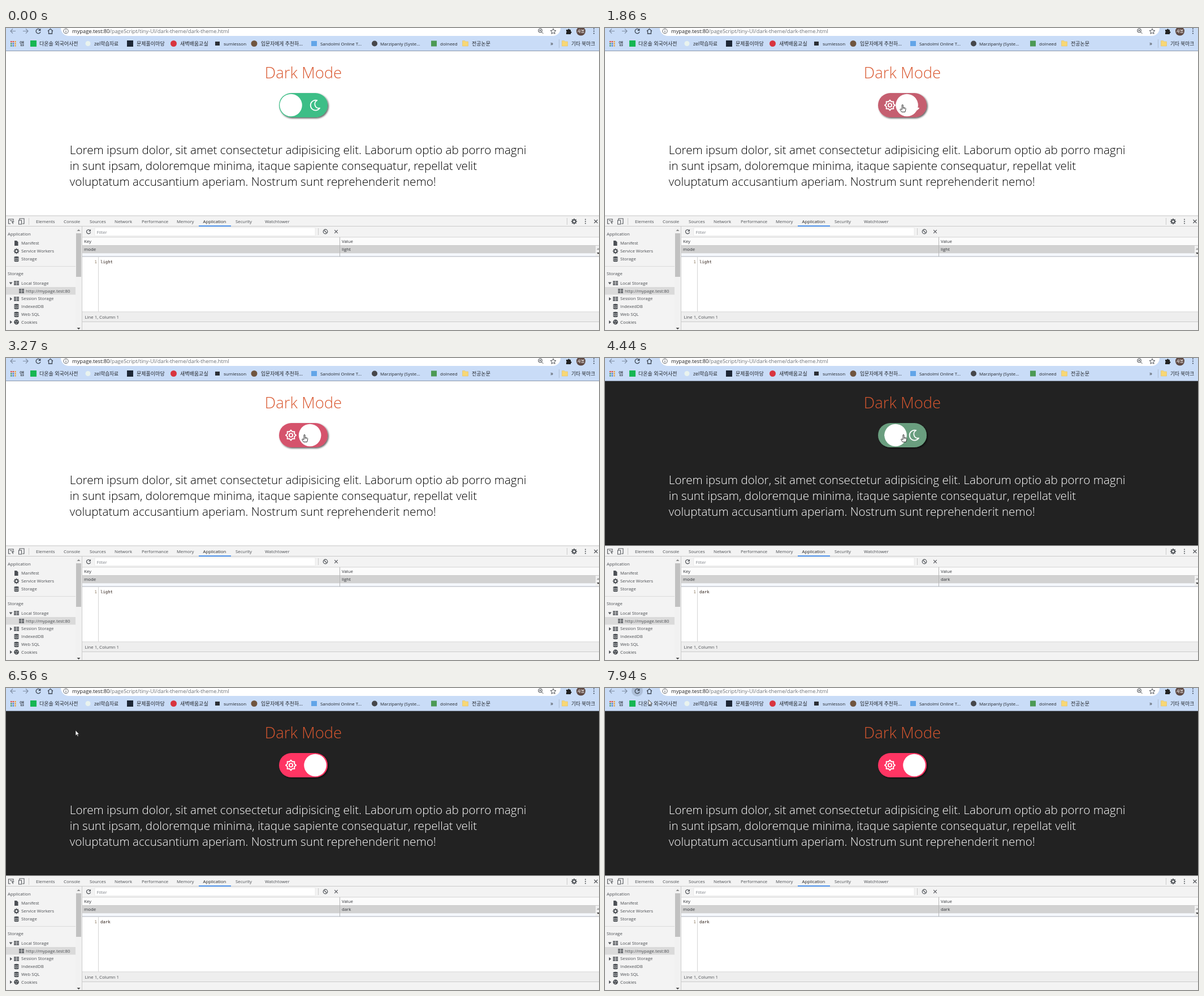
Animation of 1049 by 534 pixels, one loop 8000 ms. Source, as an HTML page:

```html
<!DOCTYPE html>
<html lang="ko">
<head>
<meta charset="utf-8">
<title>Dark mode demo</title>
<style>
html, body { margin: 0; width: 100%; height: 100%; overflow: hidden; background: #fff; }
svg { display: block; width: 100%; height: 100%; }
text { font-family: 'Open Sans', 'Noto Sans CJK KR', 'Noto Sans CJK', sans-serif; white-space: pre; }
.page { font-weight: 300; }
.mono { font-family: 'DejaVu Sans Mono', monospace; }
</style>
</head>
<body>
<svg id="stage" viewBox="0 0 1049 534" preserveAspectRatio="none"></svg>
<script>
const LOOP = 8000, FLIP_MS = 400;
const flips = [1140, 1780, 2474, 3205, 4372];
const reload = { click: 7465, blank: 7540, paint: 7700, text: 7930 };

// pointer hot spot: time, x, y
const trail = [
  [70, 973, 500], [300, 760, 330], [540, 584, 189], [690, 578, 184], [1010, 516, 136],
  [1230, 514.5, 134.5], [1470, 503, 135], [1610, 526, 136], [2350, 527, 136], [2410, 528, 136],
  [4800, 528, 136], [5140, 530, 140], [5500, 73, 451], [5640, 76, 448], [6000, 658, 390],
  [6070, 655, 388], [6310, 46, 436], [6560, 123, 75], [6860, 118, 24], [7240, 57, 5],
  [7470, 57, 5], [7790, 77, 21], [8000, 77, 21]
];

const rect = (x, y, w, h, fill, extra = '') =>
  `<rect x="${x}" y="${y}" width="${w}" height="${h}" fill="${fill}" ${extra}/>`;
const dot = (x, y, r, fill, extra = '') =>
  `<circle cx="${x}" cy="${y}" r="${r}" fill="${fill}" ${extra}/>`;
const path = (d, fill, stroke = 'none', w = 1, extra = '') =>
  `<path d="${d}" fill="${fill}" stroke="${stroke}" stroke-width="${w}" ${extra}/>`;
const line = (d, stroke, w = 1) => path(d, 'none', stroke, w);
const label = (x, y, s, size = 7.8, fill = '#4a4d51', extra = '') =>
  `<text x="${x}" y="${y}" font-size="${size}" fill="${fill}" ${extra}>${s}</text>`;
const at = (x, y, s, extra = '') => `<g transform="translate(${x} ${y})" ${extra}>${s}</g>`;

// closed ring whose radius follows a repeating list
function ring(radii, repeats, turn = 0) {
  const n = radii.length * repeats, pts = [];
  for (let i = 0; i < n; i++) {
    const a = (i + turn) / n * Math.PI * 2, r = radii[i % radii.length];
    pts.push((r * Math.cos(a)).toFixed(2) + ' ' + (r * Math.sin(a)).toFixed(2));
  }
  return 'M' + pts.join('L') + 'Z';
}
const cog = (x, y, r) => at(x, y, path(ring([r, r, r * .72, r * .72], 8, -.5), '#4d5156') + dot(0, 0, r * .35, '#f3f3f3'));
const disk = (x, y) => at(x, y,
  path('M-4 -3.2A4 1.5 0 0 1 4 -3.2V3.2A4 1.5 0 0 1 -4 3.2Z', '#4d5156') +
  line('M-4 -1.5Q0 .3 4 -1.5M-4 1.4Q0 3.2 4 1.4', '#f3f3f3', .8));
const table = (x, y) => at(x, y, rect(-4.5, -3.7, 9, 7.4, '#4d5156') +
  line('M-4.5 -1.3H4.5M-4.5 1.2H4.5M0 -3.7V3.7', '#e6e6e6', .8));
const spin = (x, y, r, color) => at(x, y,
  line(`M${r * .8} ${-r * .6}A${r} ${r} 0 1 0 ${r} ${r * .3}`, color, 1.3) +
  path(`M${r * 1.1} ${-r * 1.2}V${-r * .1}H0Z`, color));
const folder = (x, y) => path(`M${x - 5} ${y - 5}h4l1.5 1.5H${x + 5}v8H${x - 5}Z`, '#f8d775', '#e0bb55', .5);
const cross = (x, y, r, color) => line(`M${x - r} ${y - r}l${2 * r} ${2 * r}m0 ${-2 * r}l${-2 * r} ${2 * r}`, color, 1.2);
const dots = (x, y, step, color) => [-1, 0, 1].map(k => dot(x, y + k * step, 1, color)).join('');

function browserBar() {
  const ink = '#3c4450', soft = '#7f8ea3';
  const bar = rect(0, 0, 1049, 41, '#c9dcf7') +
    rect(97, -14, 884, 28, '#fff', 'rx="14"') +
    rect(0, 40, 1049, 1, '#8a98ab') +
    line('M17 5.5H8M12 1.5L8 5.5L12 9.5', soft, 1.2) +
    line('M30 5.5H39M35 1.5L39 5.5L35 9.5', soft, 1.2) +
    dot(57, 5, 10, '#aebfd8', 'id="hover"') +
    `<g id="again">${spin(57, 5.5, 4, ink)}</g><g id="stop">${cross(57, 5.5, 3.5, ink)}</g>` +
    line('M74 5.5L78.5 1.5L83 5.5M75.5 5V10H81.5V5', ink, 1.3) +
    dot(106, 5.5, 4.2, 'none', 'stroke="#5f6368"') + line('M106 5V8M106 3V4', '#5f6368', 1.1) +
    label(117, 9, 'mypage.test:80<tspan fill="#6d7278">/pageScript/tiny-UI/dark-theme/dark-theme.html</tspan>', 9.3, '#202124') +
    dot(945, 4.5, 3.2, 'none', 'stroke="#4d5156" stroke-width="1.1"') +
    line('M947.5 7L950.5 10M943.5 4.5H946.5M945 3V6', '#4d5156') +
    path('M968 1L969.4 4.2L973 4.5L970.3 6.8L971.1 10.3L968 8.4L964.9 10.3L965.7 6.8L963 4.5L966.6 4.2Z', 'none', '#4d5156', 1) +
    path('M991 3H994A1.5 1.5 0 0 1 997 3H999V6A1.5 1.5 0 0 1 999 9V11H991V8A1.4 1.4 0 0 0 991 5.5Z', '#222') +
    dot(1017, 5.5, 8, '#5d4842') + label(1017, 8.3, '새봄', 7, '#fff', 'text-anchor="middle"') +
    dots(1040, 5.5, 4, ink);
  let apps = '';
  ['#e0513f', '#e0513f', '#e9a33a', '#4d9a58', '#4679d8', '#e9a33a', '#4d9a58', '#4679d8', '#e9a33a']
    .forEach((c, i) => apps += rect(8 + i % 3 * 3.6, 23 + (i / 3 | 0) * 3.6, 2.4, 2.4, c));
  const marks = [
    [59, '다온솔 외국어사전', 9], [156, 'zel학습자료', 8.7], [231, '문제풀이마당', 9], [308, '새벽배움교실', 9],
    [385, 'sumlesson', 8], [451, '입문자에게 추천하...', 8.8], [556, 'Sandolmi Online T...', 7.9],
    [662, 'Marzipanly (Syste...', 7.9], [768, 'doIneed', 8], [824, '전공논문', 9], [1000, '기타 북마크', 8.7], [24, '앱', 9]
  ].map(([x, s, size]) => label(x, 30.5, s, size, '#23272d')).join('');
  const icons = rect(43, 22, 11, 11, '#16b653') + dot(145, 27.5, 4.5, '#e9f3ee') +
    rect(214, 22, 11, 11, '#1d2736') + dot(296.5, 27.5, 5.5, '#d8343f') +
    rect(370, 24, 8, 7, '#2b2f35') + dot(439, 27.5, 5.5, '#70553f') +
    rect(540, 23, 10, 9, '#62a5e8') + dot(652, 27.5, 5, '#46474b') + rect(752, 22.5, 10, 10, '#4c9a55') +
    folder(812.5, 27.5) + folder(988.5, 27.5);
  return bar + apps + icons + marks + label(963, 30.5, '»', 10, '#333') + rect(978, 20, 1, 15, '#aebfd6');
}

function devTools() {
  const grey = '#f3f3f3', rule = '#cbcbcb', ink = '#55585d', dark = '#303338';
  const tabs = [[53, 'Elements'], [102, 'Console'], [148, 'Sources'], [192, 'Network'], [240, 'Performance'],
    [302, 'Memory'], [348.5, 'Application', '#222'], [406, 'Security'], [458, 'Watchtower']];
  const side = [[3, 367, 'Application'], [27, 383.5, 'Manifest'], [27, 397.5, 'Service Workers'], [27, 411.3, 'Storage'],
    [3, 437.5, 'Storage'], [27, 454, 'Local Storage'], [35, 468, 'http://mypage.test:80'], [27, 481.7, 'Session Storage'],
    [27, 495.5, 'IndexedDB'], [27, 509.2, 'Web SQL'], [27, 523, 'Cookies']];
  return rect(0, 332, 1049, 202, grey) + rect(0, 331.5, 1049, 1, '#c4c4c4') + rect(0, 350, 1049, 1, rule) +
    // tab strip
    path('M8 346H4.5V338H13V341M7 340L13.5 342.5L10.8 343.7L13 346.2', 'none', ink, 1.1) +
    path('M24 340V337H32V346H29M22.5 340H27.5V347H22.5Z', 'none', ink, 1.1) +
    rect(40, 336, 1, 12, rule) + tabs.map(([x, s, c]) => label(x, 344.7, s, 7.8, c)).join('') +
    rect(341, 349.4, 57, 1.5, '#1a73e8') + rect(992, 336, 1, 12, rule) +
    cog(1005, 342, 5.3) + dots(1025, 342, 3.5, ink) + cross(1043.5, 342, 3, ink) +
    // sidebar
    rect(0, 458, 123, 13.5, '#dadada') + rect(0, 421, 123, 1, '#dcdcdc') +
    rect(123, 351, 11, 183, '#f1f1f1') + rect(124, 363, 9, 77, '#c1c1c1') + rect(134, 351, 1, 183, rule) +
    path('M125.5 359H131.5L128.5 356Z', '#888') + path('M125.5 530H131.5L128.5 533Z', '#444') +
    path('M15 376H19L21.5 378.5V385H15Z', '#4d5156') + cog(18.5, 394.5, 5) + disk(18.5, 408.5) +
    table(18.5, 451) + table(27.5, 465) + table(18.5, 479) + disk(18.5, 492.5) + disk(18.5, 506.5) +
    dot(18.5, 520, 4.4, '#4d5156') + [[17, 518.5], [20, 519], [18, 522]].map(p => dot(...p, .8, grey)).join('') +
    path('M5.5 449.5H11.5L8.5 453.5Z', ink) +
    [479, 520].map(y => path(`M7 ${y - 3}V${y + 3}L11 ${y}Z`, ink)).join('') +
    side.map(([x, y, s]) => label(x, y - .4, s)).join('') +
    // storage table
    spin(146, 360, 3.6, ink) + rect(157, 353, 390, 14.5, '#fff', 'stroke="#e2e2e2" stroke-width=".6"') +
    label(160.5, 363.5, 'Filter', 7.8, '#80848a') + rect(552, 354, 1, 12, rule) +
    dot(565, 360, 3.8, 'none', 'stroke="#4d5156" stroke-width="1.2"') + line('M562.5 357.5L567.5 362.5', ink, 1.2) +
    cross(584, 360, 2.8, ink) + rect(135, 369.5, 914, 1, rule) +
    rect(135, 370.5, 914, 14, '#fbfbfb') + rect(135, 384, 914, 1, rule) + rect(135, 385, 908, 13.5, '#d2d2d2') +
    rect(135, 398.5, 908, 5.5, '#f5f8fd') + rect(590, 370, 1, 34, '#b5b5b5') + rect(1043, 385, 6, 19, '#f1f1f1') +
    path('M1045 392H1050L1047.5 389Z', '#999') + path('M1045 397H1050L1047.5 400Z', '#444') +
    label(138, 380, 'Key', 7.8, dark) + label(594, 380, 'Value', 7.8, dark) +
    label(138, 394.3, 'mode', 7.8, dark) + label(594, 394.3, '', 7.8, dark, 'id="cell"') +
    // value viewer
    rect(135, 404, 914, 98, '#fff') + rect(135, 403.5, 914, 1, '#a9b0ba') + rect(163, 405, 1, 96.5, '#d4d4d4') +
    label(156.5, 415.5, '1', 7.3, '#8a765c', 'class="mono"') +
    label(167, 415.5, '', 7.3, '#2b1c14', 'class="mono" id="code"') +
    rect(135, 501.5, 914, 1, rule) + rect(135, 502.5, 914, 17, '#eeeeee') + rect(135, 519, 914, 1, rule) +
    label(139.5, 513.8, 'Line 1, Column 1', 7.8);
}

function webPage() {
  const lines = [
    'Lorem ipsum dolor, sit amet consectetur adipisicing elit. Laborum optio ab porro magni',
    'in sunt ipsam, doloremque minima, itaque sapiente consequatur, repellat velit',
    'voluptatum accusantium aperiam. Nostrum sunt reprehenderit nemo!'
  ];
  const icon = d => path(d, 'none', '#fff', 1.9, 'stroke-linejoin="round"');
  const moon = 'M3.2 -8.5A9 9 0 1 0 8 5.3A7.4 7.4 0 0 1 3.2 -8.5Z';
  return rect(0, 41, 1049, 291, '#fff', 'id="paper"') +
    '<g id="copy" class="page">' +
    label(526, 88.5, 'Dark Mode', 27.5, '#d9572f', 'text-anchor="middle"') +
    '<g id="prose">' + lines.map((s, i) => `<text x="112.8" y="${223 + 28 * i}" font-size="20.66">${s}</text>`).join('') + '</g></g>' +
    '<g id="toggle">' + rect(483, 115, 86, 43, '#3dbe87', 'rx="21.5" id="track" filter="url(#shade)"') +
    at(504, 136.5, icon(ring([9, 6.7], 8)) + dot(0, 0, 3.1, 'none', 'stroke="#fff" stroke-width="1.9"')) +
    at(547, 136.5, icon(moon)) +
    dot(504, 136.5, 19.8, '#fff', 'id="knob"') + '</g>';
}

const arrow = path('M0 0V9.5L2.2 7.5L3.7 11L5.2 10.3L3.7 7H6.5Z', '#fff', '#222', .7);
const hand = path('M-1 0Q0 -1 1 0V4.5L5 5.5Q6 6 5.7 8L4.5 12.5H-1.5L-4.2 8.5Q-4.5 7 -3 7.2L-1 8.5Z', '#fff', '#222', .9) +
  line('M1 4.5V7M3 5V7.5', '#222', .7);

document.getElementById('stage').innerHTML =
  '<defs><filter id="shade" x="-20%" y="-30%" width="140%" height="170%"><feDropShadow dx="1.7" dy="1.7" stdDeviation="1.6" flood-color="#000" flood-opacity=".65"/></filter></defs>' +
  webPage() + browserBar() + devTools() +
  `<g id="pointer"><g id="arrow">${arrow}</g><g id="hand">${hand}</g></g>`;

const ui = {};
document.querySelectorAll('svg [id]').forEach(el => ui[el.id] = el);
const show = (el, on) => el.setAttribute('visibility', on ? 'visible' : 'hidden');
const mix = (a, b, p) => a + (b - a) * p;

// CSS "ease": cubic-bezier(.25, .1, .25, 1)
function ease(x) {
  if (x <= 0) return 0;
  if (x >= 1) return 1;
  const curve = (a, b, u) => 3 * a * u * (1 - u) ** 2 + 3 * b * u * u * (1 - u) + u ** 3;
  let lo = 0, hi = 1;
  for (let i = 0; i < 24; i++) {
    const mid = (lo + hi) / 2;
    if (curve(.25, .25, mid) < x) lo = mid; else hi = mid;
  }
  return curve(.1, 1, lo);
}

function movePointer(t) {
  show(ui.pointer, t >= trail[0][0]);
  const i = Math.max(1, trail.findIndex(k => k[0] > t));
  const [t0, x0, y0] = trail[i - 1], [t1, x1, y1] = trail[i];
  const p = Math.max(0, (t - t0) / (t1 - t0));
  const x = mix(x0, x1, p), y = mix(y0, y1, p);
  const link = x > 483 && x < 569 && y > 115 && y < 158;
  ui.pointer.setAttribute('transform', `translate(${x.toFixed(1)} ${y.toFixed(1)})`);
  ui.arrow.style.display = link ? 'none' : '';
  ui.hand.style.display = link ? '' : 'none';
}

function draw(t) {
  const flipped = lag => flips.filter(f => t >= f + lag).length;
  const n = flipped(0);
  const p = n ? ease((t - flips[n - 1]) / FLIP_MS) : 0;
  const pos = n % 2 ? p : n ? 1 - p : 0;
  const blank = t >= reload.blank && t < reload.paint;
  const dark = flipped(-8) % 2 === 1 && !blank;
  const value = flipped(50) % 2 ? 'dark' : 'light';

  ui.paper.setAttribute('fill', dark ? '#222222' : '#ffffff');
  ui.prose.setAttribute('fill', dark ? '#ffffff' : '#000000');
  ui.knob.setAttribute('cx', mix(504, 547, pos).toFixed(2));
  ui.track.setAttribute('fill', `rgb(${[[61, 255], [190, 52], [135, 100]].map(c => Math.round(mix(...c, pos)))})`);
  show(ui.copy, t < reload.blank || t >= reload.text);
  show(ui.toggle, !blank);
  ui.cell.textContent = ui.code.textContent = value;

  const loading = t >= reload.click && t < reload.text;
  show(ui.hover, t >= 7150);
  show(ui.again, !loading);
  show(ui.stop, loading);
  movePointer(t);
}

const start = performance.now();
function tick() {
  draw((performance.now() - start) % LOOP);
  requestAnimationFrame(tick);
}
draw(0);
requestAnimationFrame(tick);
</script>
</body>
</html>
```
